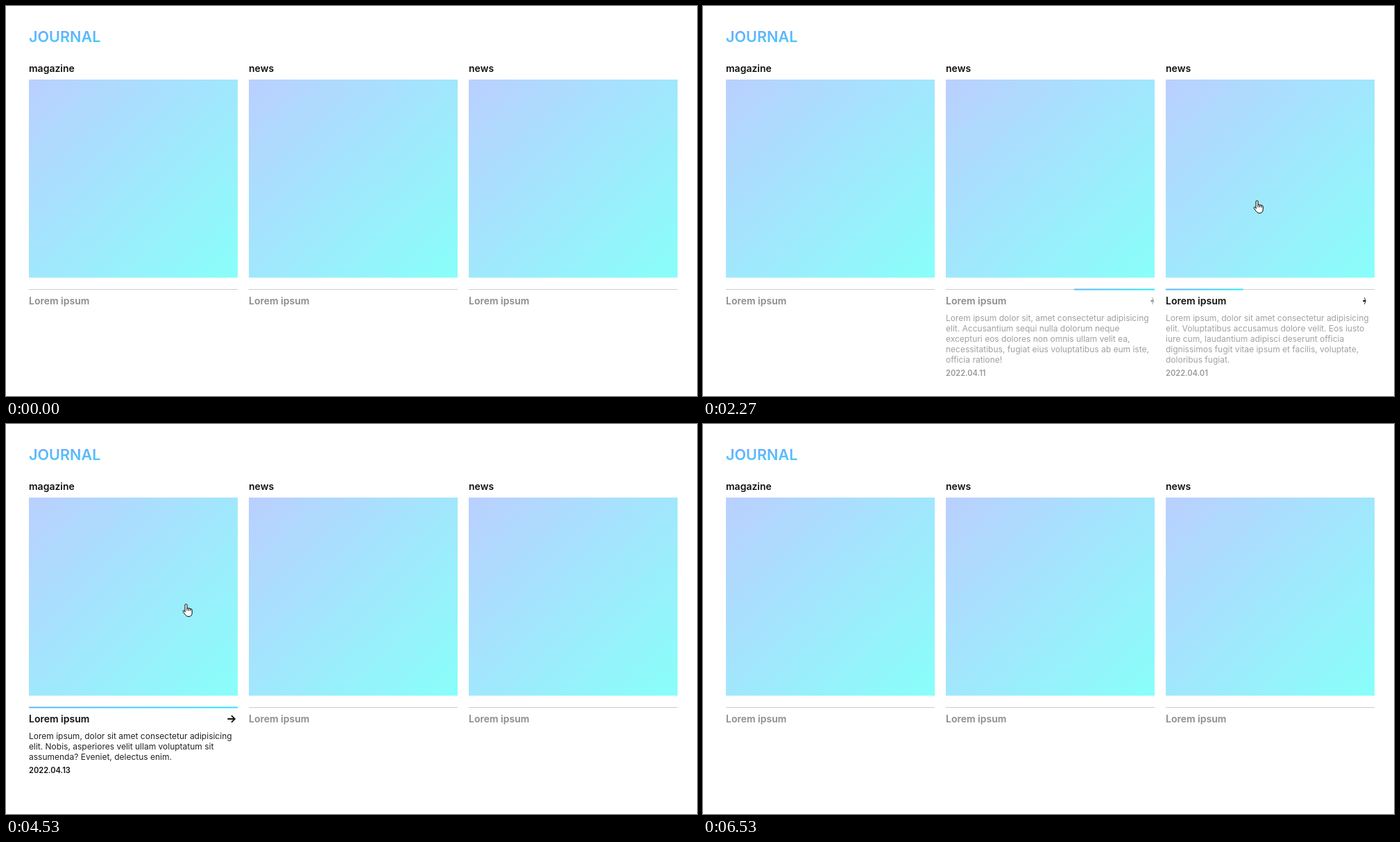
Write an HTML page that moves like this. It is 996 by 562 pixels and loops after 6.87 s.

```html
<!DOCTYPE html>
<html lang="en">
<head>
<meta charset="utf-8">
<title>Journal</title>
<style>
  html, body { margin: 0; width: 100%; height: 100%; overflow: hidden; background: #fff; }
  svg { display: block; width: 996px; height: 562px; }
  text { font-family: Inter, sans-serif; fill: #111; }
  .logo { font-size: 21.6px; font-weight: 600; fill: url(#logoTint); }
  .label, .title { font-size: 14px; font-weight: 600; }
  .desc { font-size: 12px; fill: #222; }
  .date { font-size: 11.1px; font-weight: 600; }
</style>
</head>
<body>
<svg id="stage" viewBox="0 0 996 562">
  <defs>
    <linearGradient id="tint" x1="0" y1="0" x2="1" y2="1">
      <stop offset="0" stop-color="#759fff"/><stop offset="1" stop-color="#11fff5"/>
    </linearGradient>
    <linearGradient id="logoTint" href="#tint" gradientUnits="userSpaceOnUse"
      gradientTransform="translate(33 31) scale(935 27)"/>
  </defs>
  <text class="logo" x="33" y="52.4">JOURNAL</text>
  <g id="cards"></g>
  <g id="hand" stroke="#000" stroke-linecap="round" stroke-linejoin="round">
    <path fill="#fff" d="M-1.5 11V1.5a1.5 1.5 0 0 1 3 0V6.5a1.3 1.3 0 0 1 2.5 .3a1.3 1.3 0 0 1 2.5 .6a1.3 1.3 0 0 1 2.2 1V12.5C8.7 16 7 18 3.6 18C.4 18 -2 14.5 -4.2 11C-5 9.2 -3.2 8.3 -1.5 10.5Z"/>
    <path fill="none" d="M1.5 6.5V9.3M4 6.8V9.3M6.5 7.4V9.6"/>
  </g>
</svg>
<script>
const LOOP = 6870, STEP = 200 / 3, FADE = 500, WIDTH = 301, PITCH = 317, LEFT = 33;
const $ = id => document.getElementById(id);
const clamp = v => Math.max(0, Math.min(1, v));
const mix = (a, b, k) => a + (b - a) * k;

// Pointer: start point, then moves of [start, duration, x, y]
const SHOW = 310, HIDE = 5990, ENTRY = [137, 560];
const moves = [
  [310, 220, 131, 289],
  [1262, 300, 500, 283],
  [1820, 195, 660, 282],
  [2015, 250, 798, 280],
  [2870, 95, 660, 272],
  [2965, 240, 475, 260],
  [3610, 120, 259, 259],
  [4535, 320, 500, 261],
  [4935, 595, 790, 260],
  [5700, 230, 800, 264]
];

const cards = [
  { label: 'magazine', date: '2022.04.13', lines: [
    'Lorem ipsum, dolor sit amet consectetur adipisicing',
    'elit. Nobis, asperiores velit ullam voluptatum sit',
    'assumenda? Eveniet, delectus enim.'] },
  { label: 'news', date: '2022.04.11', lines: [
    'Lorem ipsum dolor sit, amet consectetur adipisicing',
    'elit. Accusantium sequi nulla dolorum neque',
    'excepturi eos dolores non omnis ullam velit ea,',
    'necessitatibus, fugiat eius voluptatibus ab eum iste,',
    'officia ratione!'] },
  { label: 'news', date: '2022.04.01', lines: [
    'Lorem ipsum, dolor sit amet consectetur adipisicing',
    'elit. Voluptatibus accusamus dolore velit. Eos iusto',
    'iure cum, laudantium adipisci deserunt officia',
    'dignissimos fugit vitae ipsum et facilis, voluptate,',
    'doloribus fugiat.'] }
];

// cubic-bezier(.42, 0, .58, 1)
function easeInOut(x) {
  if (x <= 0 || x >= 1) return clamp(x);
  let u = x;
  for (let i = 0; i < 6; i++) {
    const f = 1.26 * u - 0.78 * u * u + 0.52 * u * u * u - x;
    u -= f / (1.26 - 1.56 * u + 1.56 * u * u);
  }
  return u * u * (3 - 2 * u);
}

function pointer(t) {
  return moves.reduce((p, [start, time, x, y]) => {
    const k = easeInOut((t - start) / time);
    return [mix(p[0], x, k), mix(p[1], y, k)];
  }, ENTRY);
}

const hovered = (i, t) => {
  const x = pointer(t)[0] - LEFT - PITCH * i;
  return t >= SHOW && t < HIDE && x >= 0 && x < WIDTH;
};

const textTag = (cls, y, s) => `<text class="${cls}" y="${y}">${s}</text>`;

$('cards').innerHTML = cards.map((c, i) => `<g transform="translate(${LEFT + PITCH * i})">
  ${textTag('label', 95, c.label)}
  <rect y="106" width="${WIDTH}" height="285.5" fill="url(#tint)" opacity=".5"/>
  <rect y="408" width="${WIDTH}" height="1" fill="#ccc"/>
  <rect class="bar" y="407.5" width="${WIDTH}" height="2" fill="url(#tint)"/>
  ${textTag('title', 430, 'Lorem ipsum')}
  <path class="arrow" d="M286.4 425H296.5M292 420.2L296.8 425L292 429.8" fill="none" stroke-width="1.8"/>
  <g class="body">
    ${c.lines.map((s, n) => textTag('desc', 454 + 15 * n, s)).join('')}
    ${textTag('date', 458 + 15 * c.lines.length, c.date)}
  </g></g>`).join('');

// Link the parts and note when the pointer enters and leaves each card
cards.forEach((c, i) => {
  for (const k of ['bar', 'title', 'arrow', 'body']) c[k] = $('cards').children[i].querySelector('.' + k);
  c.turns = [];
  for (let t = 0, was = false; t < LOOP; t++) {
    const on = hovered(i, t);
    if (on !== was) c.turns.push({ t, on });
    was = on;
  }
});

// Grow from the left edge, shrink towards the right edge
function squash(el, s, on, left) {
  const origin = on ? left : WIDTH;
  el.setAttribute('transform', `translate(${origin * (1 - s)}) scale(${s} 1)`);
  el.style.display = s > 0.001 ? '' : 'none';
}

function drawCard(c, t) {
  const turn = c.turns.filter(e => e.t <= t).pop() || { t: -FADE, on: false };
  const k = clamp((t - turn.t) / FADE), on = turn.on;
  const s = on ? easeInOut(k) : 1 - easeInOut(k);
  squash(c.bar, s, on, 0);
  squash(c.arrow, s, on, 283);
  c.title.style.fill = c.arrow.style.stroke = on ? '#111' : '#8c8c8c';
  c.body.setAttribute('opacity', on ? k : 1 - k);
}

function drawHand(t) {
  const [x, y] = pointer(t).map(v => Math.round(v) + 0.5);
  $('hand').setAttribute('transform', `translate(${x} ${y})`);
  $('hand').style.display = t >= SHOW && t < HIDE ? '' : 'none';
}

function draw(ms) {
  // the picture is refreshed 15 times a second
  const t = Math.floor((ms % LOOP + 4) / STEP) * STEP;
  cards.forEach(c => drawCard(c, t));
  drawHand(t);
}

const start = performance.now();
function tick() {
  draw(performance.now() - start);
  requestAnimationFrame(tick);
}
tick();
</script>
</body>
</html>
```
